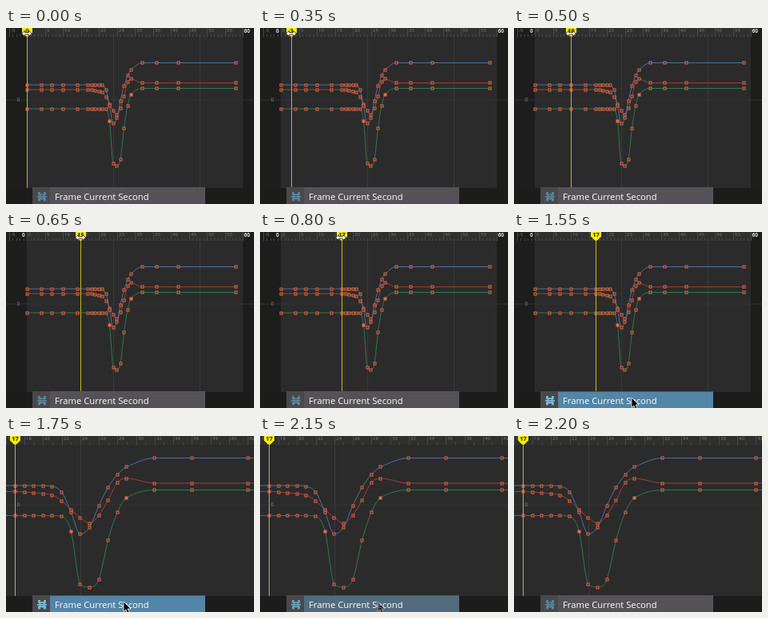
Write an HTML page that moves like this. It is 310 by 220 pixels and loops after 2.85 s.

```html
<!DOCTYPE html>
<html lang="en">
<head>
<meta charset="utf-8">
<title>Frame Current Second</title>
<style>
  html, body { margin: 0; width: 100%; height: 100%; overflow: hidden; background: #1c1c1c; }
  svg { display: block; width: 310px; height: 220px; }
  text { font-family: "Open Sans", "Noto Sans", sans-serif; }
  .tick { font-size: 6px; fill: #7c7c7c; }
  .range { font: bold 6.5px "Open Sans", sans-serif; fill: #e4e4e4; }
  .curve { fill: none; stroke-width: 1; }
  .key { fill: #2b2b2b; stroke: #ea6a42; stroke-width: 1; }
  .key.on { fill: #ea6a42; }
  #num { font: bold 7.5px "Open Sans", sans-serif; text-anchor: middle; fill: #222200; }
  .item { font-size: 11.25px; fill: #fff; }
  .icon { fill: none; stroke-width: 1.6; }
  .pointer { fill: #000; stroke: #fff; stroke-width: .8; }
</style>
</head>
<body>
<svg viewBox="0 0 310 220">
  <defs>
    <clipPath id="graph"><rect width="310" height="200"/></clipPath>
    <path id="arrow" d="M0 0V12.5L2.9 9.9L4.9 14.2L7 13.2L5.1 9H9Z"/>
    <path id="brackets" d="M43 205.8H41V209M47 205.8H49V209M41 212.5V215.4H43M49 212.5V215.4H47M39 210.7H51M42.5 208H47.5V213.4H42.5Z"/>
  </defs>
  <rect width="310" height="220" fill="#1c1c1c"/>
  <g clip-path="url(#graph)">
    <g id="wide"></g>
    <g id="near"></g>
    <g id="head">
      <path id="line" d="M0 9V200"/>
      <path d="M-6.5 0H6.5V5.5L1.5 10.5H-1.5L-6.5 5.5Z" fill="#ffee00"/>
      <text id="num" y="6.2"></text>
    </g>
    <path id="slide" d="M-6.5 7L-2.5 3.5V5.8H2.5V3.5L6.5 7L2.5 10.5V8.2H-2.5V10.5Z"
          fill="#fff" stroke="#222" stroke-width=".8"/>
    <use id="travel" href="#arrow" class="pointer"/>
  </g>
  <rect x="33" y="199" width="216" height="21" fill="#545256"/>
  <rect x="33" y="199" width="22" height="21" fill="#49484b"/>
  <use href="#brackets" class="icon" stroke="#5c8ba6"/>
  <text class="item" x="61" y="215">Frame Current Second</text>
  <g id="hover">
    <rect x="55" y="200" width="194" height="20" fill="#5285a6"/>
    <use href="#brackets" class="icon" stroke="#7cc0dc"/>
    <text class="item" x="61" y="215">Frame Current Second</text>
    <use href="#arrow" class="pointer" x="147" y="207"/>
  </g>
</svg>
<script>
const $ = id => document.getElementById(id);
const LOOP = 2850, STEP = 50, ZOOM_AT = 1750;

// Curves as y positions in the close view, sampled at these frames.
const frames = [0, 4, 7, 10, 14, 17, 18, 19, 20, 21, 22, 23, 24, 25, 26, 27, 28, 29, 32, 36, 42, 58];
const flat = (y, n) => Array(n).fill(y);
const curves = [
  { color: "#32784a", ys: [...flat(99.5, 9), 99.6, 100.5, 119, 185, 189, 179, 130, 95, 77, ...flat(67.5, 4)], on: [23, 29] },
  { color: "#a53c36", ys: [...flat(69.5, 6), 70, 71, 72, 74, 81, 92, 102, 109, 99, 80, 58, 53, ...flat(59, 4)], on: [] },
  { color: "#4f6f9f", ys: [...flat(62, 9), 63, 70, 95, 122.5, 114, 87, 64, 48, 38.5, ...flat(27.5, 4)], on: [] }
];

const wide = { x: f => 26 + 4.5 * f, y: v => 43.5 + (v - 27.5) / 1.252, zero: 90, label: 5, from: -5, to: 64, range: [26, 296] };
const near = { x: f => 11.5 + 11.62 * (f - 17), y: v => v, zero: 86, label: 2, from: 16, to: 43, range: [0, 310] };

// Slope is flat at peaks and limited elsewhere, so curves never overshoot.
function slope(ys, i) {
  if (!i || i === ys.length - 1) return 0;
  const a = (ys[i] - ys[i - 1]) / (frames[i] - frames[i - 1]);
  const b = (ys[i + 1] - ys[i]) / (frames[i + 1] - frames[i]);
  if (a * b <= 0) return 0;
  const mid = (ys[i + 1] - ys[i - 1]) / (frames[i + 1] - frames[i - 1]);
  return Math.sign(mid) * Math.min(Math.abs(mid), 3 * Math.abs(a), 3 * Math.abs(b));
}

function curvePath(ys, v) {
  const at = (f, y) => v.x(f).toFixed(2) + " " + v.y(y).toFixed(2);
  let d = "M" + at(frames[0], ys[0]);
  for (let i = 1; i < ys.length; i++) {
    const third = (frames[i] - frames[i - 1]) / 3;
    d += "C" + at(frames[i - 1] + third, ys[i - 1] + slope(ys, i - 1) * third) +
         " " + at(frames[i] - third, ys[i] - slope(ys, i) * third) +
         " " + at(frames[i], ys[i]);
  }
  return d;
}

const rect = (x, y, w, h, fill) => `<rect x="${x}" y="${y}" width="${w}" height="${h}" fill="${fill}"/>`;

function drawView(v) {
  const [left, right] = v.range;
  let out = rect(0, 0, 310, 200, "#1d1d1d") +
            rect(left, 0, right - left, 200, "#2b2b2c") +
            rect(left, 0, right - left, 11, "#303030") +
            rect(0, v.zero - .5, 310, 1, "#343434");
  for (const f of [24, 48]) out += rect(Math.round(v.x(f)), 11, 1, 189, "#393939");
  for (let f = v.from; f <= v.to; f++) {
    const x = Math.round(v.x(f)), major = f % v.label === 0;
    out += rect(x, major ? 0 : 8, 1, major ? 11 : 3, "#484848");
    if (major && !(v === wide && f === 60)) out += `<text class="tick" x="${x + 2}" y="5.2">${f}</text>`;
  }
  out += `<text class="tick" x="13.5" y="${v.zero + 2}" style="font-size:7px">0</text>`;
  if (v === wide) out += rect(297, 0, 13, 11, "#1d1d1d") +
    '<text class="range" x="20" y="5.5">0</text><text class="range" x="297.5" y="5.5">60</text>';
  for (const c of curves) out += `<path class="curve" stroke="${c.color}" d="${curvePath(c.ys, v)}"/>`;
  for (const c of curves) {
    frames.forEach((f, i) => {
      const x = Math.round(v.x(f) - .5) + .5, y = Math.round(v.y(c.ys[i]) - .5) + .5;
      out += `<rect class="key${c.on.includes(f) ? " on" : ""}" x="${x - 1.5}" y="${y - 1.5}" width="3" height="3"/>`;
    });
  }
  return out;
}

const clamp = n => Math.max(0, Math.min(1, n));
const show = (el, on) => el.style.display = on ? "" : "none";
const move = (el, x, y) => el.setAttribute("transform", `translate(${x} ${y})`);

function render(now) {
  const t = Math.floor(now % LOOP / STEP) * STEP;
  const zoomed = t >= ZOOM_AT;
  show($("wide"), !zoomed);
  show($("near"), zoomed);

  const frame = Math.round(17 * Math.sin(clamp((t - 300) / 500) * Math.PI / 2));
  const x = Math.floor((zoomed ? near : wide).x(frame)) + .5;
  move($("head"), x, 0);
  $("num").textContent = frame;
  $("line").setAttribute("stroke", zoomed ? "#a9a9a3" : "#c4b711");

  show($("slide"), t < 1000);
  move($("slide"), x - (t >= 800 ? 1.5 : .5), 0);
  show($("travel"), t >= 1000 && t < 1200);
  const go = clamp((t - 950) / 250);
  move($("travel"), 101 + 46 * go, 7 + 200 * go);

  const hover = t < 2150 ? clamp((t - 1400) / 150) : t < 2200 ? .5 : 0;
  $("hover").setAttribute("opacity", hover);
}

$("wide").innerHTML = drawView(wide);
$("near").innerHTML = drawView(near);

function tick() {
  render(performance.now());
  requestAnimationFrame(tick);
}
tick();
</script>
</body>
</html>
```
